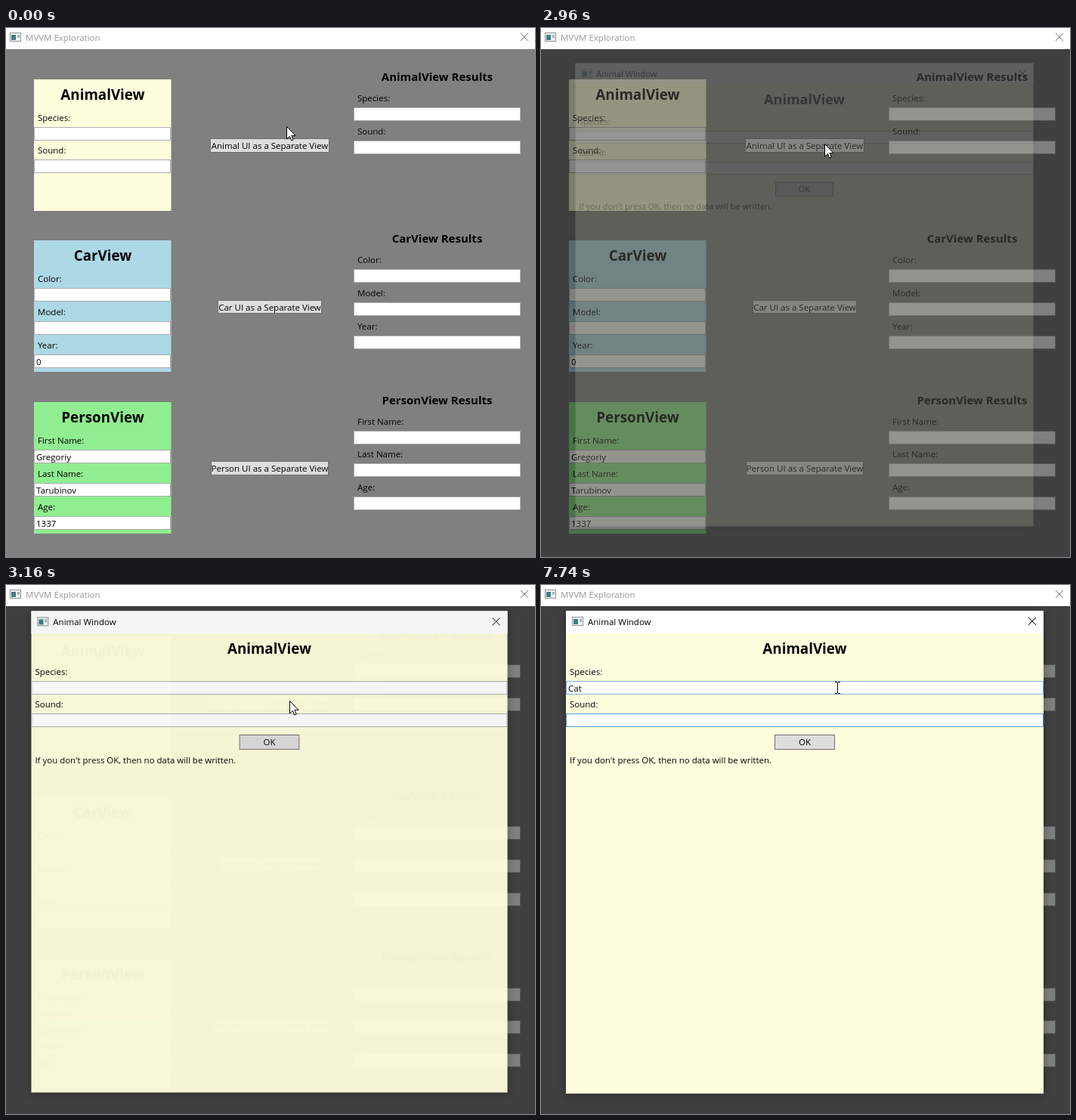
An HTML page that plays this animation: 700 by 700 pixels, repeating every 8000 ms.

```html
<!DOCTYPE html>
<html lang="en">
<head>
<meta charset="utf-8">
<title>View demo</title>
<style>
html, body { margin: 0; width: 100%; height: 100%; overflow: hidden; background: #808080; }
svg { display: block; width: 100%; height: 100%; }
text { font: 11.5px "Open Sans", "Noto Sans", sans-serif; white-space: pre; }
.mid { text-anchor: middle; }
.big { font-size: 18.8px; font-weight: 700; }
.head { font-size: 15px; font-weight: 700; }
#dialog { filter: drop-shadow(0 2px 6px rgba(0,0,0,.3)); }
</style>
</head>
<body>
<svg id="stage" viewBox="0 0 700 700"></svg>
<script>
const stage = document.getElementById('stage');
const GREY = '#abadb3', HOVER = '#7eb4ea', FOCUS = '#569de5';

// Static markup helpers
const fill = (x, y, w, h, c, more = '') =>
  `<rect x="${x}" y="${y}" width="${w}" height="${h}" fill="${c}" ${more}/>`;
const box = (x, y, w, h, c, line, id = '') =>
  fill(x + .5, y + .5, w - 1, h - 1, c, `stroke="${line}" id="${id}"`);
const text = (x, y, s, cls = '', more = '') =>
  `<text x="${x}" y="${y}" class="${cls}" ${more}>${s}</text>`;
const input = (x, y, w, id, value = '') =>
  box(x, y, w, 18, '#fff', GREY, id) + text(x + 3, y + 14, value, '', `id="${id}Text"`);
const button = (x, y, w, h, label, id) =>
  box(x, y, w, h, '#ddd', '#707070', id) + text(x + w / 2, y + 14, label, 'mid');
const icon = (x, y) => box(x, y, 15, 12, '#f4f6f7', '#8c9297') +
  fill(x + 2, y + 3, 6, 7, '#3f7f83') + fill(x + 10, y + 3, 3, 4, '#a9b4bc');
const cross = (x, y, id) =>
  `<path id="${id}" d="M${x} ${y}l10 10m0-10l-10 10" fill="none" stroke="#000"/>`;

const views = [
  { name: 'Animal', color: '#ffffde', top: 67.5, resTop: 105.3, btn: [270, 146, 158, 19],
    fields: [['Species:', ''], ['Sound:', '']] },
  { name: 'Car', color: '#add8e6', top: 281.3, resTop: 318.9, btn: [280, 360, 138, 18],
    fields: [['Color:', ''], ['Model:', ''], ['Year:', '0']] },
  { name: 'Person', color: '#90ee90', top: 495.1, resTop: 532.5, btn: [271, 573, 156, 19],
    fields: [['First Name:', 'Gregoriy'], ['Last Name:', 'Tarubinov'], ['Age:', '1337']] }
];

function viewMarkup({ name, color, top, resTop, btn, fields }) {
  const y0 = Math.round(top), r0 = Math.round(resTop);
  let out = fill(37, y0, 181.5, 174, color) +
    text(128, y0 + 27, name + 'View', 'mid big') +
    text(570.5, r0 - 35, name + 'View Results', 'mid head') +
    button(...btn, name + ' UI as a Separate View', 'btn' + name);
  fields.forEach(([label, value], i) => {
    const y = Math.round(top + 63 + 43.9 * i), r = Math.round(resTop + 43.8 * i);
    out += text(42, y - 8, label) + input(37, y, 181, name + i, value) +
      text(465, r - 8, label) + input(460, r, 221, name + 'Result' + i);
  });
  return out;
}

stage.innerHTML =
  fill(0, 0, 700, 700, '#808080') + fill(0, 0, 700, 28, '#fff') + icon(5, 6) +
  text(26, 17, 'MVVM Exploration', '', 'id="title"') + cross(681, 7, 'close') +
  views.map(viewMarkup).join('') +
  fill(0, 28, 700, 672, '#000', 'id="dim" opacity=".5"') +
  '<g id="dialog">' +
  fill(33, 34, 632, 639, '#ffffde') + fill(33, 34, 632, 30, '#fff') + icon(41, 42) +
  text(62, 53, 'Animal Window') + cross(645, 43, 'dlgClose') +
  text(349, 91, 'AnimalView', 'mid big') +
  text(38, 119, 'Species:') + input(33, 127, 632, 'species') +
  text(38, 162, 'Sound:') + input(33, 170, 632, 'sound') +
  button(309, 198, 80, 20, 'OK', 'ok') +
  text(38, 236, "If you don't press OK, then no data will be written.") +
  fill(36, 127, 1, 17, '#000', 'id="caret"') +
  '</g>' +
  '<path id="arrow" d="M.5 .5V17L4.3 13.4L6.8 19L9.2 18L6.8 12.4H12Z" fill="#fff" stroke="#000"/>' +
  '<path id="beam" d="M-3 -7.5H0M1 -7.5H4M.5 -7V7M-3 7.5H0M1 7.5H4" fill="none" stroke="#000"/>';

const el = id => document.getElementById(id);
const set = (id, name, value) => el(id).setAttribute(name, value);
const show = (id, on) => set(id, 'visibility', on ? 'visible' : 'hidden');

// Pointer strokes: start, end, steps, control point, end point
const strokes = [
  [70, 410, 6, [335, 281], [323, 205]],
  [610, 680, 2, [329, 193], [335, 182]],
  [1530, 1880, 6, [322, 165], [180, 133]],
  [2130, 2810, 10, [290, 172], [375, 153]],
  [3960, 4240, 4, [378, 152], [388, 131]],
  [4330, 4420, 2, [390, 134], [392, 136]]
];

function pointer(t) {
  let pos = [371, 130];
  for (const [start, end, n, mid, to] of strokes) {
    if (t < start) break;
    const gap = (end - start) / (n - 1);
    const u = Math.min(n, Math.floor((t - start) / gap + 1e-6) + 1) / n;
    pos = pos.map((p, i) =>
      Math.round((1 - u) ** 2 * p + 2 * u * (1 - u) * mid[i] + u * u * to[i]));
  }
  return pos;
}

// Value of the last [time, ...values] row that has begun
const at = (rows, t) => rows.filter(r => r[0] <= t).pop().slice(1);
const inside = ([px, py], x, y, w, h) => px >= x && px < x + w && py >= y && py < y + h;

const opening = [[0, 1, 0], [2960, .959, .16], [3040, .978, .5], [3090, .989, .775],
  [3160, .997, .95], [3230, 1, 1]];
const typed = [[0, ''], [6380, 'C'], [6480, 'Ca'], [6940, 'Cat']];
const blink = [[0, 0], [4420, 1], [4820, 0], [5350, 1], [5820, 0], [6280, 1],
  [6880, 0], [6940, 1], [7740, 0]];
const caretX = [36, 43, 49, 53];

function draw(t) {
  const pos = pointer(t), open = t >= 2960, tabbed = t >= 7140;
  const active = t >= 2740 && !open;

  set('title', 'fill', active ? '#000' : '#999');
  set('close', 'stroke', active ? '#000' : '#777');
  show('dim', open);

  const overButton = !open && inside(pos, ...views[0].btn);
  set('btnAnimal', 'fill', overButton ? (active ? '#c4e5f6' : '#bee6fd') : '#ddd');
  set('btnAnimal', 'stroke', overButton ? (active ? '#2c628b' : '#3c7fb1') : '#707070');

  const overLeft = !open && inside(pos, 37, 131, 181, 18);
  const overSpecies = open && inside(pos, 33, 127, 632, 18);
  set('Animal0', 'stroke', overLeft ? HOVER : GREY);
  set('species', 'stroke', t >= 4420 && !tabbed ? FOCUS : overSpecies ? HOVER : GREY);
  set('sound', 'stroke', tabbed ? FOCUS : GREY);

  const [scale, alpha] = at(opening, t);
  show('dialog', open);
  set('dialog', 'opacity', alpha);
  set('dialog', 'transform', scale < 1
    ? `translate(348.5 353) scale(${scale}) translate(-349 -353.5)` : '');

  const [word] = at(typed, t);
  el('speciesText').textContent = word;
  show('caret', open && at(blink, t)[0]);
  set('caret', 'x', tabbed ? 36 : caretX[word.length]);
  set('caret', 'y', tabbed ? 171 : 127);

  const beam = overLeft || overSpecies, typing = t >= 6380 && !tabbed;
  show('arrow', !beam);
  show('beam', beam && !typing);
  for (const id of ['arrow', 'beam']) set(id, 'transform', `translate(${pos})`);
}

function tick() {
  draw(performance.now() % 8000);
  requestAnimationFrame(tick);
}
tick();
</script>
</body>
</html>
```
